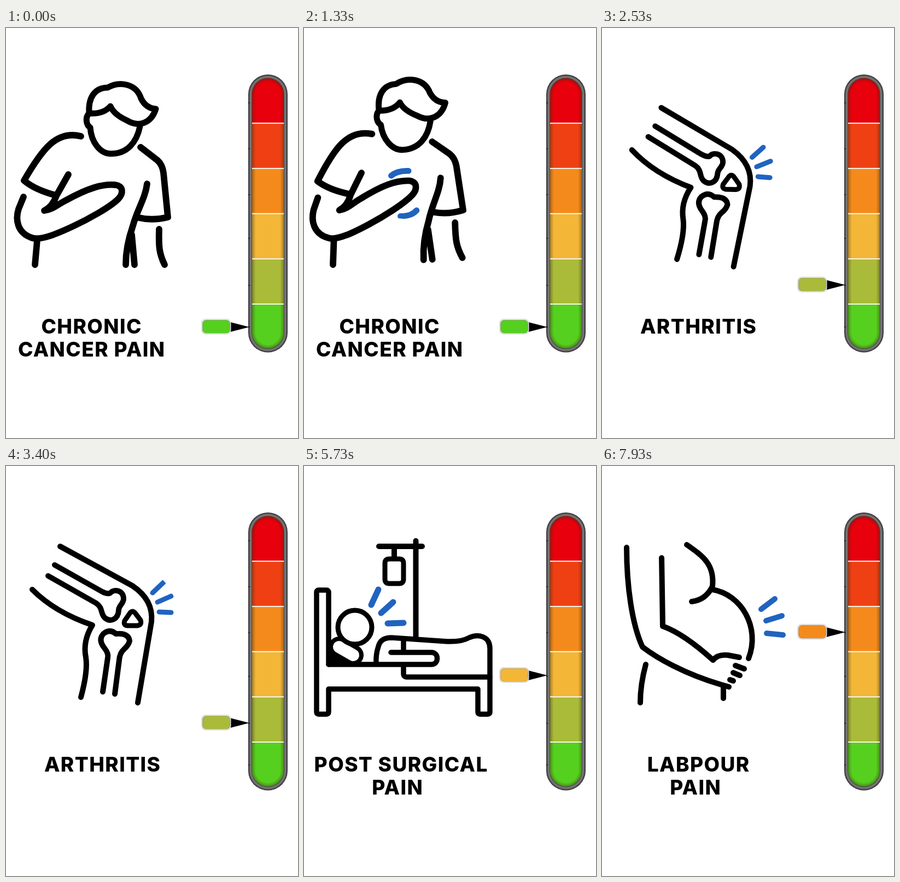
Animation of 534x750 px, one loop 8 s. Source, as an HTML page with a canvas:

```html
<!DOCTYPE html>
<html lang="en">
<head>
<meta charset="utf-8">
<title>Pain scale</title>
<style>
html, body { margin: 0; width: 100%; height: 100%; overflow: hidden; background: #fff; }
canvas { display: block; width: 534px; height: 750px; }
</style>
</head>
<body>
<canvas id="stage"></canvas>
<script>
const W = 534, H = 750, LOOP = 8000;
const canvas = document.getElementById('stage');
const ctx = canvas.getContext('2d');
const dpr = window.devicePixelRatio || 1;
canvas.width = W * dpr;
canvas.height = H * dpr;

const BLUE = '#2063c0';
const LEVELS = ['#e8000d', '#ef4014', '#f58a1c', '#f3b637', '#aabb3a', '#55d01f'];
const SWING = 1430, PULSE = 1140;

const clamp = x => Math.max(0, Math.min(1, x));
const ramp = (t, start, length) => clamp((t - start) / length);

function stroke(d, width, color = '#000') {
  ctx.lineWidth = width;
  ctx.strokeStyle = color;
  ctx.stroke(new Path2D(d));
}

function fillRound(x, y, w, h, r, color) {
  ctx.beginPath();
  ctx.roundRect(x, y, w, h, r);
  ctx.fillStyle = color;
  ctx.fill();
}

function drawChest() {
  stroke('M152 156 C150 125 164 109 186 109 C207 97 238 101 247 129 Q256 147 274 148 ' +
    'C266 173 244 183 221 169 Q197 158 191 143 Q178 158 152 156 Z', 11);
  stroke('M152 156 C144 164 147 178 154 182 C156 209 172 230 192 230 C222 230 239 209 245 180', 11);
  stroke('M137 198 C93 187 67 220 33 279 Q53 296 91 306', 11.8);
  stroke('M114 268 L92 307 Q85 327 70 334 C86 332 94 323 110 315 C150 293 176 285 200 287 ' +
    'C215 289 215 303 205 313 C190 328 150 350 122 363 C94 376 64 389 48 384 ' +
    'C20 375 17 350 23 331 L32 309', 11.8);
  stroke('M57 388 L53 433 M246 218 L277 242 Q286 250 288 265 L296 346 Q268 353 243 347', 11.8);
  stroke('M258 285 C255 311 240 332 232 362 Q219 399 219 433 M230 378 L235 433', 11.8);
  stroke('M280 368 C279 400 280 412 290 433', 11.8);
}

function drawKnee() {
  stroke('M99 147 L231 219 Q270 245 266 285 L241 433', 10);
  stroke('M89 181 L176 230 Q188 236 192 231 C198 225 215 227 215 243 C215 252 206 255 206 264 ' +
    'C205 281 191 286 181 278 C172 270 178 260 165 251 L77 201', 10);
  stroke('M226 270 Q231 262 237 270 L246 282 Q249 291 240 292 L222 292 Q214 291 217 283 Z', 9);
  stroke('M48 226 Q90 268 158 291 Q140 320 146 350 Q150 375 137 423', 10);
  stroke('M177 413 L186 351 Q188 343 180 333 Q168 318 178 307 Q190 297 201 307 ' +
    'Q224 305 226 320 Q224 328 216 335 Q208 342 207 355 L199 417', 10);
}

function drawBed() {
  stroke('M137 147 H216 M204.5 137 V316 M165 150 V168', 10);
  stroke('M156 170 H174 Q182 170 182 178 V207 Q182 215 174 215 H156 Q148 215 148 207 V178 Q148 170 156 170 Z', 9);
  ctx.fillStyle = '#000';
  ctx.fill(new Path2D('M44 330 L95 363 H44 Z'));
  stroke('M64 331 L90 346', 38);
  stroke('M64 331 L90 346', 22, '#fff');
  ctx.beginPath();
  ctx.arc(93, 295, 31, 0, 7);
  ctx.fillStyle = '#fff';
  ctx.fill();
  ctx.lineWidth = 9;
  ctx.strokeStyle = '#000';
  ctx.stroke();
  stroke('M45 363 V231 Q45 227 41 227 H27 Q23 227 23 231 V450 Q23 454 27 454 H41 Q45 454 45 450 ' +
    'V408 H318 V450 Q318 454 322 454 H336 Q340 454 340 450 V334 C340 312 320 306 302 314 ' +
    'Q288 322 262 321 L160 314 Q140 314 136 330 Q131 345 132 362', 9.5);
  stroke('M45 363 H233 C247 363 247 341 233 341 H159 M182 316 V341 M182 363 V380 Q182 386 188 386 H340', 9.5);
}

function drawBelly() {
  stroke('M45 149 C45 220 55 290 74 331 C100 351 150 380 218 400 L232 404', 10);
  stroke('M109 168 L111 293 Q150 307 203 355 Q212 344 230 346 L251 350', 10);
  stroke('M155 144 C185 165 206 180 202 220 Q190 245 164 248 M202 226 C255 235 290 295 268 352', 10);
  stroke('M244 365 L260 371 M240 378 L252 383 M234 391 L240 393 M222 404 V425 M80 363 Q70 400 70 433', 10);
}

// reveal: centre x, y and the radii between which the blue marks are wiped
const SCENES = [
  {
    from: -1000, out: 1685, next: 2000, draw: drawChest,
    pivot: [53, 433], lean: 0, sway: 0.054, swayAt: 0,
    marks: 'M142 272 Q155 249 179 246 M168 276 Q180 267 200 269 M181 351 Q200 353 211 342 M158 370 Q189 386 215 365',
    markWidth: 10.8, reveal: [188, 308, 25, 88], pulseAt: 70,
    text: [['CHRONIC', 156], ['CANCER PAIN', 156]]
  },
  {
    from: 1960, out: 3640, next: 3990, draw: drawKnee,
    pivot: [137, 424], lean: 0.05, sway: 0.05, swayAt: 1980,
    marks: 'M268 232 L288 213 M277 249 L302 238 M280 267 L302 268',
    markWidth: 9, reveal: [228, 269, 44, 89], pulseAt: 1965,
    text: [['ARTHRITIS', 176]]
  },
  {
    from: 4003, out: 5870, next: 6320, draw: drawBed,
    pivot: [0, 0], lean: 0, sway: 0, swayAt: 0,
    marks: 'M123 254 L136 226 M141 269 L163 249 M153 288 L182 287',
    markWidth: 11, reveal: [93, 295, 44, 98], pulseAt: 4200,
    text: [['POST SURGICAL', 177], ['PAIN', 170.5]]
  },
  {
    from: 6331, out: 9000, next: LOOP, draw: drawBelly,
    pivot: [70, 433], lean: 0.047, sway: 0.047, swayAt: 6450,
    marks: 'M291 262 L316 243 M300 283 L329 274 M301 306 L331 309',
    markWidth: 10, reveal: [195, 318, 102, 150], pulseAt: 6475,
    text: [['LABPOUR', 176], ['PAIN', 170.5]]
  }
];

function pulse(t, start) {
  if (t < start) return 0;
  const p = (t - start) % PULSE;
  return Math.min(ramp(p, 0, 330), 1 - ramp(p, 670, 330));
}

function veil(y, h, opacity) {
  ctx.fillStyle = `rgba(255,255,255,${1 - opacity})`;
  ctx.fillRect(0, y, 356, h);
}

function drawScene(s, t) {
  const visible = (inLag, outLag) =>
    ramp(t, s.from + inLag, 390) * (1 - ramp(t, s.out + outLag, 250));

  ctx.save();
  ctx.lineCap = ctx.lineJoin = 'round';
  const swung = t < s.swayAt ? 0 : (1 - Math.cos(Math.PI * (t - s.swayAt) / SWING)) / 2;
  ctx.translate(...s.pivot);
  ctx.rotate(s.lean - s.sway * swung);
  ctx.translate(-s.pivot[0], -s.pivot[1]);
  s.draw();

  const grown = pulse(t, s.pulseAt);
  if (grown > 0) {
    const [x, y, near, far] = s.reveal;
    ctx.beginPath();
    ctx.arc(x, y, near + (far - near) * grown, 0, 7);
    ctx.clip();
    stroke(s.marks, s.markWidth, BLUE);
  }
  ctx.restore();
  veil(0, 500, visible(0, 0));

  ctx.font = '800 37px Inter, "Open Sans", sans-serif';
  ctx.letterSpacing = '1.4px';
  ctx.textAlign = 'center';
  ctx.fillStyle = '#000';
  s.text.forEach(([line, x], i) => ctx.fillText(line, x + 0.7, 558.5 + i * 42));
  veil(500, 150, visible(22, 60));
}

function drawGauge() {
  ['#38383c', '#47474a', '#5c5c5e', '#737373', '#7d7d7b', '#6c6c6a', '#535353'].forEach((c, i) =>
    fillRound(443 + i, 85 + i, 72 - 2 * i, 508.5 - 2 * i, 36 - i, c));
  ctx.fillStyle = '#111';
  for (const y of [136, 220, 304, 384, 470, 546]) ctx.fillRect(443, y, 3, 1.5);

  ctx.save();
  ctx.beginPath();
  ctx.roundRect(450, 92, 58, 494, 29);
  ctx.clip();
  LEVELS.forEach((c, i) => {
    ctx.fillStyle = c;
    ctx.fillRect(450, 91.5 + i * 82.7, 58, 84);
  });
  ctx.strokeStyle = 'rgba(60,50,20,0.09)';
  for (const w of [2, 4, 6, 9, 12]) {
    ctx.lineWidth = w;
    ctx.stroke();
  }
  ctx.fillStyle = '#fff8ea';
  for (let i = 0; i < 5; i++) ctx.fillRect(450, 173.2 + i * 82.7, 58, 2);
  ctx.restore();
}

function mix(a, b, k) {
  const part = (c, i) => parseInt(c.slice(i, i + 2), 16);
  return `rgb(${[1, 3, 5].map(i => Math.round(part(a, i) + (part(b, i) - part(a, i)) * k))})`;
}

function drawPointer(t) {
  const y = 547 - 77 * ramp(t, 1660, 256) - 87 * ramp(t, 3600, 256) - 79 * ramp(t, 5880, 256);
  const changes = [2250, 4200, 6620];
  const step = changes.findIndex(at => t < at + 110);
  const color = step < 0 ? LEVELS[2]
    : mix(LEVELS[5 - step], LEVELS[4 - step], ramp(t, changes[step], 110));
  ctx.fillStyle = '#000';
  ctx.beginPath();
  ctx.moveTo(410, y - 9);
  ctx.lineTo(445, y);
  ctx.lineTo(410, y + 9);
  ctx.fill();
  fillRound(357, y - 15, 54.5, 28.5, 8, '#d2d2d2');
  fillRound(358, y - 14, 52.5, 26.5, 7, '#f6f4ee');
  fillRound(359, y - 13, 51, 24.5, 7, '#888');
  fillRound(359.6, y - 12.4, 49.8, 23.3, 6.5, color);
}

function render(now) {
  const t = now % LOOP;
  ctx.setTransform(dpr, 0, 0, dpr, 0, 0);
  ctx.fillStyle = '#fff';
  ctx.fillRect(0, 0, W, H);
  drawScene(SCENES.find(s => t < s.next), t);
  drawGauge();
  drawPointer(t);
}

const start = performance.now();
function tick() {
  render(performance.now() - start);
  requestAnimationFrame(tick);
}
tick();
</script>
</body>
</html>
```
